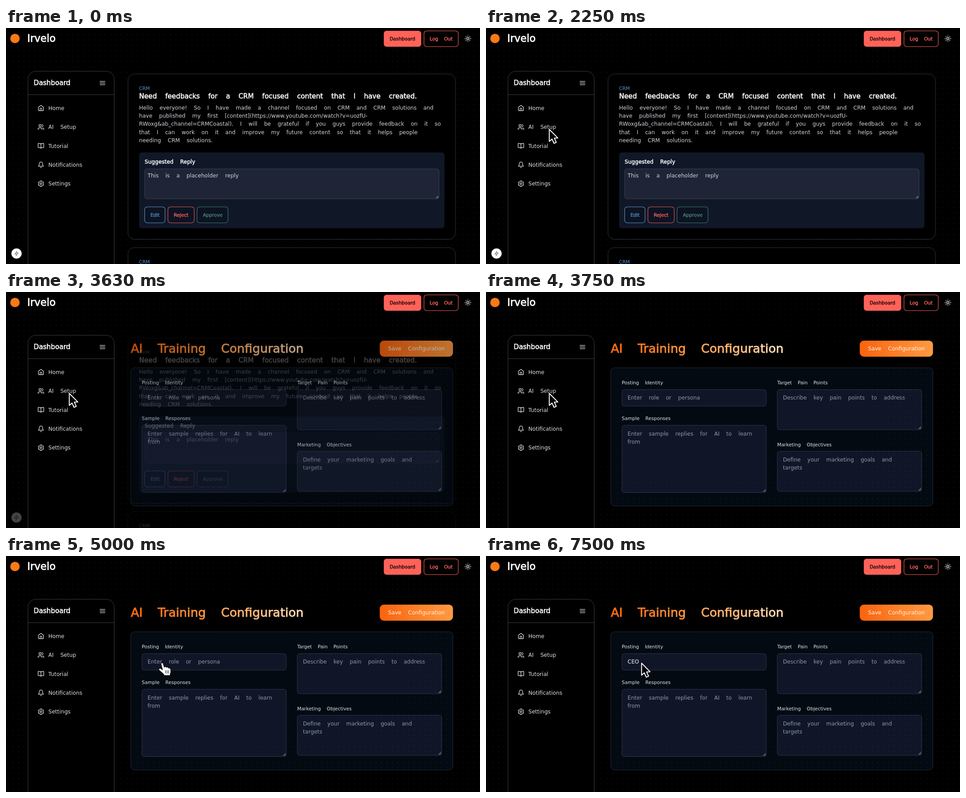
Recreate the animation shown at these times as an HTML page. Size 1058 by 529 pixels, loop 8 s.

```html
<!DOCTYPE html>
<html lang="en">
<head>
<meta charset="utf-8">
<title>Dashboard</title>
<style>
  html, body { margin: 0; width: 100%; height: 100%; overflow: hidden; background: #000; }
  svg { display: block; width: 100vw; height: 100vh; }
  text { font-family: "DejaVu Sans", sans-serif; word-spacing: .925em; white-space: pre; }
  #form { mix-blend-mode: plus-lighter; }
</style>
</head>
<body>
<svg id="stage" viewBox="0 0 1058 529">
  <defs>
    <pattern id="dots" width="12.1" height="12.1" patternUnits="userSpaceOnUse">
      <circle cx="3.5" cy="2.5" r=".65" fill="#2c2c2c"/>
    </pattern>
    <radialGradient id="fade">
      <stop offset=".3" stop-color="#000"/>
      <stop offset="1" stop-color="#fff"/>
    </radialGradient>
    <mask id="edges"><rect width="1058" height="529" fill="url(#fade)"/></mask>
    <linearGradient id="title" gradientUnits="userSpaceOnUse" x1="278" x2="664" y1="0" y2="0">
      <stop offset="0" stop-color="#f9650f"/>
      <stop offset=".45" stop-color="#ff9640"/>
      <stop offset="1" stop-color="#ffdfb8"/>
    </linearGradient>
    <linearGradient id="save">
      <stop offset="0" stop-color="#f9630e"/>
      <stop offset="1" stop-color="#ff9a42"/>
    </linearGradient>
  </defs>
  <rect width="1058" height="529"/>
  <rect width="1058" height="529" fill="url(#dots)" mask="url(#edges)"/>
  <g id="feed"></g>
  <g id="form"></g>
  <g id="shell"></g>
  <g id="pointer">
    <path id="arrow" d="M1.3 1.3V28.3L7.4 22.8L11.7 32.5L16.8 30.3L12.6 20.8L20.2 20.4Z" stroke="#fff" stroke-width="2" stroke-linejoin="round"/>
    <g id="hand" fill="#fff" stroke="#000" stroke-linejoin="round" stroke-linecap="round">
      <path d="M.2 3.6C-.6 .4 3.8 -.6 4.9 2.6L7.2 10.6Q7.8 8.7 9.7 9Q11.5 9.3 11.9 11Q13 9.6 14.8 10.2Q16.5 10.8 16.7 12.4Q18.6 11.4 20.2 12.8Q21.8 14.4 21.8 19C21.8 23 20.2 25 20 28.8H7.5C5.9 24.6 .4 21 -3.8 17C-5.8 14.5 -3.2 12 -.7 13.6L3.2 16.2Z"/>
      <path d="M9.9 17.5l.9 6.5M13.5 17.5l.5 6.5M17.1 17.5l-.1 6.5" fill="none"/>
    </g>
  </g>
</svg>
<script>
const $ = id => document.getElementById(id);
const LOOP = 8000, BASE = 12.1, SMALL = 10.58, BIG = 15.1;

// Bold thickens the glyph up and to the right of its origin.
const text = (x, y, s, fill, size = BASE, bold = 0) =>
  `<text x="${x + bold / 2}" y="${y - bold / 2}" font-size="${size}" fill="${fill}"` +
  (bold ? ` stroke="${fill}" stroke-width="${bold}"` : '') +
  `>${s.replace(/&/g, '&amp;')}</text>`;

const box = (x, y, x2, y2, r, fill, stroke = 'none', w = 1) =>
  `<rect x="${x}" y="${y}" width="${x2 - x}" height="${y2 - y}" rx="${r}" fill="${fill}" stroke="${stroke}" stroke-width="${w}"/>`;

const icon = (cx, cy, body, color = '#e4e6ea', k = .63) =>
  `<g transform="translate(${cx} ${cy}) scale(${k}) translate(-12 -12)" fill="none" stroke="${color}"
    stroke-width="2" stroke-linecap="round" stroke-linejoin="round">${body}</g>`;

const path = d => `<path d="${d}"/>`;
const ring = (x, y, r) => `<circle cx="${x}" cy="${y}" r="${r}"/>`;
const grip = (x, y) =>
  `<path d="M${x - 7} ${y - 1.5}l5.5-5.5M${x - 4} ${y - 1.5}l2.5-2.5" stroke="#c4c7cd"/>`;

function gear() {
  let d = '';
  for (let i = 0; i < 72; i++) {
    const a = i * Math.PI / 36;
    const r = 8.9 + 1.2 * Math.tanh(2 * Math.cos(6 * a));
    d += (i ? 'L' : 'M') + (12 + r * Math.sin(a)).toFixed(2) + ' ' + (12 - r * Math.cos(a)).toFixed(2);
  }
  return path(d + 'Z') + ring(12, 12, 3);
}

function sun() {
  let d = '';
  for (let i = 0; i < 8; i++) {
    const s = Math.sin(i * Math.PI / 4), c = Math.cos(i * Math.PI / 4);
    d += `M${12 + 8.5 * s} ${12 + 8.5 * c}L${12 + 10.5 * s} ${12 + 10.5 * c}`;
  }
  return ring(12, 12, 4) + path(d);
}

const menu = [
  ['Home', path('M15 21v-8a1 1 0 0 0-1-1h-4a1 1 0 0 0-1 1v8M3 10a2 2 0 0 1 .7-1.5l7-6a2 2 0 0 1 2.6 0l7 6A2 2 0 0 1 21 10v9a2 2 0 0 1-2 2H5a2 2 0 0 1-2-2z')],
  ['AI Setup', path('M16 21v-2a4 4 0 0 0-4-4H6a4 4 0 0 0-4 4v2M22 21v-2a4 4 0 0 0-3-3.9M16 3.1a4 4 0 0 1 0 7.8') + ring(9, 7, 4)],
  ['Tutorial', path('M12 7v14M3 18a1 1 0 0 1-1-1V4a1 1 0 0 1 1-1h5a4 4 0 0 1 4 4 4 4 0 0 1 4-4h5a1 1 0 0 1 1 1v13a1 1 0 0 1-1 1h-6a3 3 0 0 0-3 3 3 3 0 0 0-3-3z')],
  ['Notifications', path('M6 8a6 6 0 0 1 12 0c0 7 3 9 3 9H3s3-2 3-9M10.3 21a2 2 0 0 0 3.4 0')],
  ['Settings', gear()]
];

const coral = '#ff6259', edge = '#30343d';

$('shell').innerHTML =
  '<circle cx="20" cy="23.5" r="10.5" fill="#f97a16"/>' +
  text(47, 31.3, 'Irvelo', '#fff', 22.67, .8) +
  box(843.3, 6.2, 926.7, 42, 6, coral) +
  text(856, 27.9, 'Dashboard', '#150505', SMALL, .4) +
  box(933, 6.5, 1009.5, 41.7, 6, '#000', coral, 1.1) +
  text(945.5, 27.9, 'Log Out', coral, SMALL, .45) +
  icon(1031, 24, sun(), '#fff') +
  `<path d="M49 540V115a18 18 0 0 1 18-18H223.5a18 18 0 0 1 18 18V540" stroke="#3a3e48"/>` +
  '<path d="M49 149.5H241.5" stroke="#3a3e48"/>' +
  text(61.5, 128.4, 'Dashboard', '#fff', BIG, .6) +
  icon(215.3, 123.3, path('M3 6h18M3 12h18M3 18h18')) +
  menu.map(([name, body], i) =>
    icon(78, 179.8 + 42.3 * i, body) + text(94.5, 184 + 42.3 * i, name, '#dcdfe4')).join('');

const post = [
  'Hello everyone! So I have made a channel focused on CRM and CRM solutions and',
  'have published my first [content](https://www.youtube.com/watch?v=uozfU-',
  'RWoxg&ab_channel=CRMCoastal). I will be grateful if you guys provide feedback on it so',
  'that I can work on it and improve my future content so that it helps people',
  'needing CRM solutions.'
];

const button = (x, x2, label, color, line) =>
  box(x, 401, x2, 436.7, 6, '#0c1322', line, 1.1) + text(x + 12.7, 422.8, label, color, SMALL, .45);

$('feed').innerHTML =
  box(272.3, 103, 1003, 473.5, 14, '#000', edge) +
  text(297, 139, 'CRM', '#5c96d8', SMALL) +
  text(297, 158.6, 'Need feedbacks for a CRM focused content that I have created.', '#fff', BIG, .6) +
  post.map((s, i) => text(297, 183.2 + 18.14 * i, s, '#d0d4da')).join('') +
  box(297, 279, 978.7, 448.7, 6, '#101828') +
  text(309.3, 303.8, 'Suggested Reply', '#fff', BASE, .45) +
  box(309.4, 315.8, 966.6, 383, 5, '#1f2536', '#3a4152') + grip(966.6, 383) +
  text(316, 335.2, 'This is a placeholder reply', '#d0d4da') +
  button(309.5, 355, 'Edit', '#5a87b6', '#5e94c9') +
  button(361.5, 420, 'Reject', '#fb6056', '#ee5a50') +
  button(426.5, 495.5, 'Approve', '#46826f', '#3f7c6a') +
  box(272.3, 492.3, 1003, 700, 14, '#000', edge) +
  text(297, 528, 'CRM', '#5c96d8', SMALL) +
  '<circle cx="23.5" cy="505.5" r="11.3" fill="#fff" stroke="#d5d5d5" stroke-width=".6"/>' +
  icon(23.5, 505.5, path('M13 3L5 14h6l-1 7 9-11h-7z'), '#777', .56);

const hint = '#8d97a8', label = '#e3e7ee';
const field = (x, y, x2, y2, grips = true) =>
  box(x, y, x2, y2, 5, '#101627', '#2f3748') + (grips ? grip(x2, y2) : '');

$('form').innerHTML =
  text(278, 136, 'AI Training Configuration', 'url(#title)', 27.2, .9) +
  box(834.3, 109, 997.7, 145, 9, 'url(#save)') +
  text(852.8, 131.2, 'Save Configuration', '#fff3e6') +
  box(278.4, 169.8, 997.5, 479.5, 9, '#040a12', '#1f2a38') +
  text(303, 207.3, 'Posting Identity', label, SMALL) +
  field(303.4, 218.8, 625.6, 255.8, false) +
  '<g id="role"></g>' +
  text(303, 287.3, 'Sample Responses', label, SMALL) +
  field(303.4, 298.8, 625.6, 449.4) +
  text(316, 321.5, 'Enter sample replies for AI to learn', hint) +
  text(316, 339.6, 'from', hint) +
  text(650, 207.3, 'Target Pain Points', label, SMALL) +
  field(650.2, 218.8, 972.4, 308.8) +
  text(662.8, 241.4, 'Describe key pain points to address', hint) +
  text(650, 345.8, 'Marketing Objectives', label, SMALL) +
  field(650.2, 357, 972.4, 446.8) +
  text(662.8, 379.8, 'Define your marketing goals and', hint) +
  text(662.8, 397.9, 'targets', hint);

const clamp = (t, a, b) => Math.min(1, Math.max(0, (t - a) / (b - a)));
const ease = p => p * p * (3 - 2 * p);
let typed = null;

function draw(t) {
  const mix = t < 3630 ? 0 : t < 3750 ? .74 : 1;
  $('feed').setAttribute('opacity', 1 - mix);
  $('form').setAttribute('opacity', mix);

  const n = t < 6500 ? 0 : t < 6750 ? 1 : t < 7000 ? 2 : 3;
  if (n !== typed) {
    typed = n;
    $('role').innerHTML = n
      ? text(316, 241.4, 'CEO'.slice(0, n), '#f1f3f6')
      : text(316, 241.4, 'Enter role or persona', hint);
  }

  const p = ease(clamp(t, 4180, 5000));
  const x = 140 + 206 * p, y = 226 + 13 * p;
  const pointing = x > 303 && t < 6500;
  $('pointer').setAttribute('transform', `translate(${x} ${y})`);
  $('pointer').setAttribute('opacity', clamp(t, 130, 500));
  $('arrow').setAttribute('display', pointing ? 'none' : 'inline');
  $('hand').setAttribute('display', pointing ? 'inline' : 'none');
}

let start = null;
function tick(now) {
  if (start === null) start = now;
  draw((now - start) % LOOP);
  requestAnimationFrame(tick);
}
draw(0);
requestAnimationFrame(tick);
</script>
</body>
</html>
```
